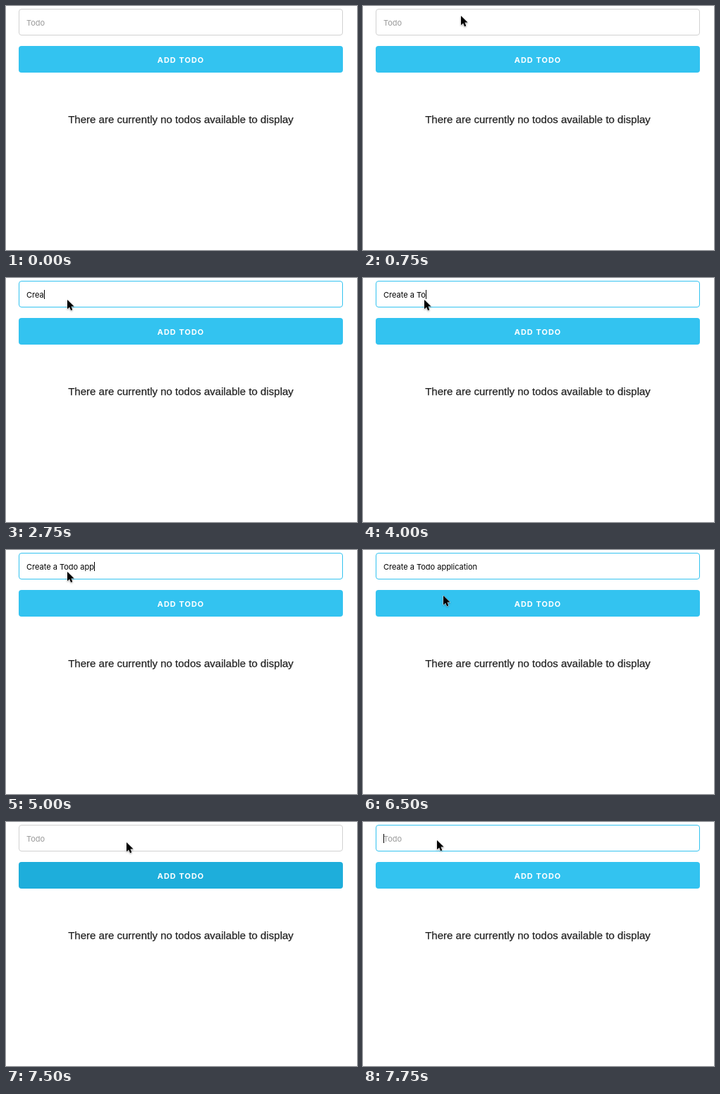
An HTML page that plays this animation: 498 px wide and 348 px high, repeating every 8000 ms.

```html
<!DOCTYPE html>
<html lang="en">
<head>
<meta charset="utf-8">
<title>Todo form</title>
<style>
html, body { margin: 0; width: 100%; height: 100%; overflow: hidden; background: #fff; }
#stage { position: relative; width: 498px; height: 348px; overflow: hidden; }
#stage > * { position: absolute; box-sizing: border-box; white-space: pre; }
#field, #button { left: 18px; width: 460px; height: 38px; border-radius: 4px; }
#field {
  top: 4px; padding-left: 10px; border: 1px solid #d1d1d1;
  font: 11px/38px Inter, sans-serif; color: #000;
}
#field.focus { border-color: #33c3f0; }
#field.empty { color: #999; }
#caret { position: absolute; top: 12px; width: 1px; height: 13px; background: #000; }
#button {
  top: 57px; background: #33c3f0; color: #fff; text-align: center;
  font: 700 11px/40px Inter, sans-serif; letter-spacing: 1px;
}
#button.active { background: #1eaedb; }
#message {
  top: 150px; left: 0; width: 496px; text-align: center;
  font: 15.03px/24px "Liberation Sans", Arial, sans-serif;
  color: #222; -webkit-text-stroke: 0.25px #222;
}
#cursor { left: 0; top: 0; width: 16px; height: 22px; overflow: visible; filter: drop-shadow(0 1px 1px #0005); }
.off { display: none; }
</style>
</head>
<body>
<div id="stage">
  <div id="field"><span id="text"></span><i id="caret"></i></div>
  <div id="button">ADD TODO</div>
  <div id="message">There are currently no todos available to display</div>
  <svg id="cursor"><path d="M0 0V13.3L3.1 10.4L5.1 15.2L7.3 14.3L5.4 9.6H9.6Z" stroke="#fff" paint-order="stroke"/></svg>
</div>
<script>
const LOOP = 8000;
const STEP = 250;
const PHRASE = "Create a Todo application";

// Key points: time, then the values reached at that time
const TYPING = [[2250, 1], [4750, 15], [6000, PHRASE.length]];
const PATH = [
  [250, 261, 42], [500, 200, 5], [750, 139, 14], [1250, 139, 14],
  [1500, 87, 31], [6250, 87, 31], [6500, 114, 65], [7000, 230, 78],
  [7250, 236, 152], [7500, 171, 29], [7750, 105, 26]
];

const [field, text, caret, button, cursor] =
  ["field", "text", "caret", "button", "cursor"].map(id => document.getElementById(id));

function follow(keys, time) {
  const next = keys.findIndex(([end]) => end > time);
  if (next < 0) return keys.at(-1).slice(1);
  const [start, ...from] = keys[Math.max(next - 1, 0)];
  const [end, ...to] = keys[next];
  const part = end > start ? (time - start) / (end - start) : 0;
  return from.map((value, i) => value + (to[i] - value) * part);
}

function draw(time) {
  const within = (start, end) => time >= start && time < end;
  const count = within(2250, 7000) ? Math.round(follow(TYPING, time)[0]) : 0;
  const [x, y] = follow(PATH, time);
  const refocused = time >= 7750;

  text.textContent = count ? PHRASE.slice(0, count) : "Todo";
  field.classList.toggle("empty", !count);
  field.classList.toggle("focus", within(1500, 7000) || refocused);
  button.classList.toggle("active", within(6750, 7750));
  caret.classList.toggle("off", !(within(1750, 6500) || refocused));
  caret.style.left = 10 + (count ? text.offsetWidth : 0) + "px";
  cursor.classList.toggle("off", time < 250);
  cursor.style.transform = `translate(${x}px, ${y}px)`;
}

const begin = performance.now();
function tick() {
  const time = (performance.now() - begin) % LOOP;
  draw(Math.floor(time / STEP) * STEP);
  requestAnimationFrame(tick);
}
tick();
</script>
</body>
</html>
```
